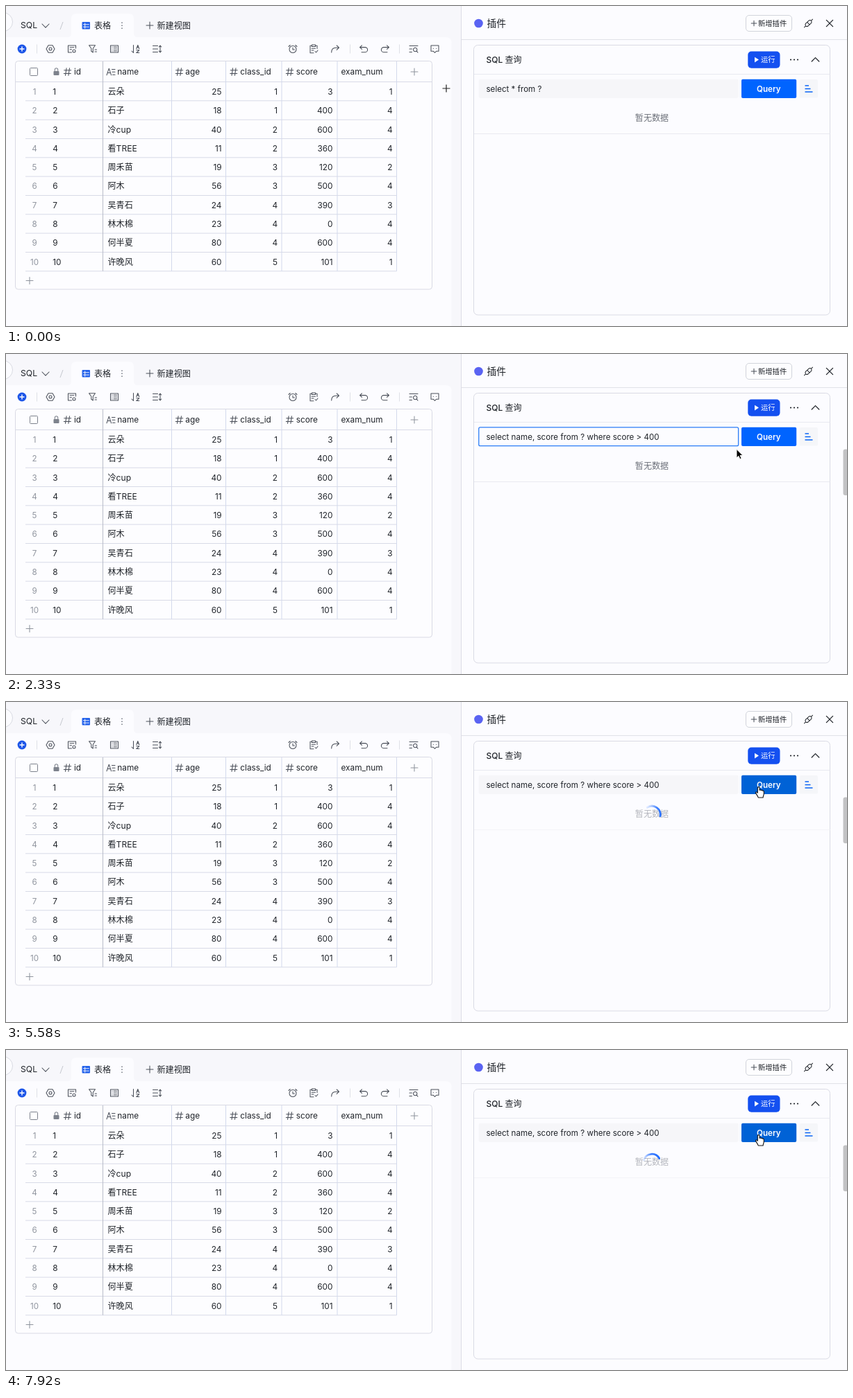
Animation, 1211 px wide and 462 px high, one loop 8000 ms. Source, as an HTML page:

```html
<!DOCTYPE html>
<html lang="zh-CN">
<head>
<meta charset="utf-8">
<title>SQL 查询</title>
<style>
html, body { margin: 0; width: 100%; height: 100%; overflow: hidden; background: #fcfcff; }
svg { display: block; width: 100%; height: 100%; }
text { font-family: Inter, "Noto Sans CJK SC", "Noto Sans CJK", sans-serif; font-size: 11.6px; fill: #1f2329; white-space: pre; }
.cell { font-size: 11.8px; }
.cjk { font-size: 12.1px; }
.small { font-size: 10.3px; }
.icon { fill: none; stroke: #4b505a; stroke-width: 1.05; stroke-linecap: round; stroke-linejoin: round; }
</style>
</head>
<body>
<svg id="stage" viewBox="0 0 1211 462" xmlns="http://www.w3.org/2000/svg">
  <defs>
    <linearGradient id="fade" gradientUnits="userSpaceOnUse" x1="-12" y1="0" x2="11" y2="0">
      <stop offset="0" stop-color="#1f6bff" stop-opacity=".12"/>
      <stop offset=".5" stop-color="#1f6bff" stop-opacity=".85"/>
      <stop offset="1" stop-color="#1f6bff"/>
    </linearGradient>
  </defs>
  <g id="left"></g>
  <g id="right"></g>
  <g id="query">
    <rect id="field" x="680.8" y="105.8" width="373.8" height="26.9" rx="2" stroke-width="1.3"/>
    <rect id="selection" x="691.5" y="107" width="80.5" height="25" fill="#b3d7ff"/>
    <text id="sql" x="691.5" y="123.5"></text>
    <path id="caret" stroke="#111" stroke-width="1"/>
    <rect id="button" x="1059" y="105.7" width="79.2" height="27.2" rx="2"/>
    <text x="1098.3" y="123.5" text-anchor="middle" style="fill:#fff;font-weight:600">Query</text>
    <text id="empty" class="cjk" x="930" y="166.4" text-anchor="middle">暂无数据</text>
    <path id="rule" d="M674 184.5H1186.5"/>
    <path id="spinner" fill="none" stroke="url(#fade)" stroke-width="2.8" stroke-linecap="round"/>
    <rect id="thumb" x="1205.5" y="137.5" width="7" height="66.5" rx="3" fill="#c2c2c4"/>
  </g>
  <g id="cursor">
    <path id="cross" d="M-5.5 0H5.5M0-5.5V5.5" stroke="#222" stroke-width="1.2"/>
    <path id="beam" d="M-3-6.5Q0-6.5 0-5Q0-6.5 3-6.5M0-5V5M-3 6.5Q0 6.5 0 5Q0 6.5 3 6.5M-1.5 1H1.5" fill="none" stroke="#111" stroke-width="1.1"/>
    <path id="arrow" d="M0 0V12.5L2.9 9.8 4.9 14.2 7 13.2 5.1 9H9Z" fill="#000" stroke="#fff" stroke-width=".9"/>
    <path id="hand" d="M-3.2-4.5a1.4 1.4 0 0 1 2.8 0V-1.2c.6-.8 2-.6 2.2.3 .7-.6 2-.3 2.1.6 .8-.4 1.9 0 1.9 1V4c0 2-1 2.5-1.2 5.5H-2.3C-2.6 7.5-5.8 4-6 2.4c-.1-1.2 1.5-1.4 2.8.3Z" fill="#fff" stroke="#111" stroke-width="1.1" stroke-linejoin="round"/>
  </g>
</svg>
<script>
const $ = id => document.getElementById(id);
const set = (id, attrs) => { for (const k in attrs) $(id).setAttribute(k, attrs[k]); };
const show = (id, on) => { $(id).style.display = on ? '' : 'none'; };

const rect = (x, y, w, h, fill, rx = 0, stroke = 'none') =>
  `<rect x="${x}" y="${y}" width="${w}" height="${h}" rx="${rx}" fill="${fill}" stroke="${stroke}"/>`;
const line = (d, color, w = 1) => `<path d="${d}" fill="none" stroke="${color}" stroke-width="${w}"/>`;
const text = (x, y, s, { cls = '', anchor = 'start', style = '' } = {}) =>
  `<text x="${x}" y="${y}" class="${cls}" text-anchor="${anchor}" style="${style}">${s}</text>`;
const icon = (x, y, d, style = '') =>
  `<path class="icon" transform="translate(${x} ${y})" d="${d}" style="${style}"/>`;
const ring = r => `M${-r} 0a${r} ${r} 0 1 0 ${2 * r} 0a${r} ${r} 0 1 0 ${-2 * r} 0`;

const PLUS = 'M-5 0H5M0-5V5';
const HASH = 'M-4.8-2.2H5.2M-5.2 2.4H4.8M-1.4-5.3L-3 5.3M3-5.3L1.4 5.3';
const GRID = '#d8dae7';

const names = ['云朵', '石子', '冷cup', '看TREE', '周禾苗', '阿木', '吴青石', '林木棉', '何半夏', '许晚风'];
const columns = [
  [310.5, [25, 18, 40, 11, 19, 56, 24, 23, 80, 60]],
  [391, [1, 1, 2, 2, 3, 3, 4, 4, 4, 5]],
  [470.5, [3, 400, 600, 360, 120, 500, 390, 0, 600, 101]],
  [556.5, [1, 4, 4, 4, 2, 4, 3, 4, 4, 1]]
];

function tabs() {
  return rect(0, 0, 656, 462, '#f7f7fb') +
    `<path d="M0 45H633Q641.5 45 641.5 53V462H0Z" fill="#fcfcff"/>` +
    `<path d="M88 45Q94 45 94 39V18Q94 11 101 11H177Q184 11 184 18V39Q184 45 190 45Z" fill="#fcfcff"/>` +
    `<circle cx="-4" cy="23" r="13.5" fill="#fcfcff" stroke="#d9dbe2"/>` +
    text(21, 32.4, 'SQL', { style: 'font-size:12.2px' }) +
    icon(57, 28.5, 'M-5-2.5L0 2.7 5-2.5') +
    line('M82 23L78 34', '#c5c8cf') +
    rect(109.5, 23, 11.5, 10.5, '#2563eb', 1) +
    line('M111 26.7H119.8M111 30.2H119.8M113.7 24.5V32.5', '#fcfcff', .9) +
    text(127, 32.5, '表格', { cls: 'cjk' }) +
    [24.2, 28.2, 32.2].map(y => `<circle cx="167" cy="${y}" r=".9" fill="#7d828c"/>`).join('') +
    icon(207, 28, PLUS) + text(217.5, 32.5, '新建视图', { cls: 'cjk' });
}

function toolbar() {
  const lines = [-2.8, 0, 2.8].map(y => `M-3.5 ${y}h.3M-1 ${y}H3.5`).join('');
  return `<circle cx="23" cy="62" r="6.4" fill="#1d56e8"/>` +
    icon(23, 62, 'M-3 0H3M0-3V3', 'stroke:#fff;stroke-width:1.4') +
    line('M44.5 55.5V68.5M495.5 55.5V68.5M566.5 55.5V68.5', '#dfe1e6') +
    icon(64, 62, 'M-3-5.2H3L6 0 3 5.2H-3L-6 0Z' + ring(2)) +
    icon(95, 62, 'M5.5-1V-5H-5.5V5H-.5M-3-2.2H3M-3 .8H-.5M1 3a2 2 0 1 0 4 0a2 2 0 1 0-4 0') +
    icon(125, 62, 'M-5.5-5.2H3.5L.3-.8V5L-2.2 3.2V-.8ZM3 1H5.5M3 4H5.5') +
    icon(156, 62, 'M-5.5-5H5.5V5H-5.5Z' + lines) +
    icon(187, 62, 'M-3.5-5.5V5.5L-6 3M.8 5.5H4.8M.8-.2L2.8-5.5 4.8-.2M1.4-2H4.2M.8 1.8H4.8L.8 5.5') +
    icon(217.5, 62, 'M-6-4.5H1M-6 0H1M-6 4.5H1M4.5-4.5V4.5M2.8-3L4.5-5 6.2-3M2.8 3L4.5 5 6.2 3') +
    icon(413, 62.5, ring(5) + 'M0-2.5V.5H2.5M-6-4L-3.8-6M6-4L3.8-6') +
    icon(443, 62, 'M-2.5-4.7H-5V5.7H0M2.5-4.7H5V-.5M-2.5-6H2.5V-3.5H-2.5ZM-2.8-.8H2.5M-2.8 2H0M2 3.5L3.5 5 6 2') +
    icon(474, 62, 'M2.2-5L5.5-1.8 2.2 1.4M5.5-1.8H1C-3-1.8-5.3 .8-5.3 5') +
    icon(515, 62, 'M-2.5-5.2L-5.5-2.4-2.5 .4M-5.5-2.4H2A3.6 3.6 0 0 1 2 4.8H-3') +
    icon(546, 62, 'M2.5-5.2L5.5-2.4 2.5 .4M5.5-2.4H-2A3.6 3.6 0 0 0-2 4.8H3') +
    icon(587, 62, 'M-6-4.5H6M-6 0H-2.5M-6 4.5H-2.5M-.5 1a2.7 2.7 0 1 0 5.4 0a2.7 2.7 0 1 0-5.4 0M4.2 3.2L6 5.2') +
    icon(617.5, 62, 'M-5.5-5H5.5V3.3H2L0 5.5-2 3.3H-5.5ZM-2.2-.8h.2M2-.8h.2');
}

function table() {
  const step = 27.33, top = 109.5, bottom = top + step * 10;
  let s = rect(13.5, 79.5, 600, 329.5, '#fdfdff', 4, '#d9dae4') +
    line(`M14 ${top}H613`, GRID);
  for (let i = 1; i <= 10; i++) s += line(`M28 ${(top + step * i).toFixed(1)}H562.5`, GRID);
  s += [238.5, 316.5, 397, 477, 562.5].map(x => line(`M${x} 80V${bottom}`, '#d3d9ec')).join('') +
    line(`M139.5 80V${bottom}`, '#b9bcc8');

  s += rect(34.5, 89.5, 11, 11, '#fff', 1, '#7d828c') +
    rect(68.5, 94, 8, 6, '#7d828c', 1) + icon(72.5, 94, 'M-2.2 0V-2a2.2 2.2 0 0 1 4.4 0V0', 'stroke:#7d828c') +
    [88.5, 249.5, 328, 408.5].map(x => icon(x, 95, HASH)).join('') +
    icon(151, 95, 'M-6 4.8L-2.7-4.8 .6 4.8M-4.9 1.5H-.5M1.5-3.5H6M2 .3H6M2.5 4.2H6') +
    icon(588, 95, PLUS, 'stroke:#8f949e') + icon(34, 396.5, PLUS, 'stroke:#8f949e');
  [['id', 98], ['name', 160.3], ['age', 258.3], ['class_id', 337.3], ['score', 417.8], ['exam_num', 482.5]]
    .forEach(([label, x]) => { s += text(x, 99, label, { cls: 'cell' }); });

  names.forEach((name, i) => {
    const y = (127.8 + step * i).toFixed(1);
    s += text(41, y, i + 1, { anchor: 'middle', style: 'fill:#8f949e' }) +
      text(67.3, y, i + 1, { cls: 'cell' }) + text(146.5, y, name, { cls: 'cjk' });
    columns.forEach(([x, values]) => { s += text(x, y, values[i], { cls: 'cell', anchor: 'end' }); });
  });
  return s;
}

function panel() {
  return rect(655.5, 0, 556, 462, '#fcfcff') +
    line('M655.5 0V462', '#dcdde6') + line('M656 48.5H1211', '#e0e1e8') +
    `<circle cx="680.5" cy="25" r="6.3" fill="#5a63f2"/>` +
    text(692.5, 30, '插件', { style: 'font-size:13.8px;font-weight:500' }) +
    rect(1065.5, 13.5, 66, 23, '#fdfdff', 4.5, '#d2d4db') +
    icon(1077, 25, 'M-3.8 0H3.8M0-3.8V3.8') + text(1083, 28.8, '新增插件', { cls: 'small' }) +
    icon(1155.5, 25, 'M-1.8-1.6L.6-4Q2.4-5.2 4-3.8Q5.2-2 4-.4L1.6 2ZM4.2-4L6-5.8M1.8 1.6L-.6 4Q-2.4 5.2-4 3.8Q-5.2 2-4 .4L-1.6-2M-4.2 4L-6 5.8', 'stroke:#1f2329') +
    icon(1186, 25, 'M-4.6-4.6L4.6 4.6M4.6-4.6L-4.6 4.6', 'stroke:#1f2329;stroke-width:1.3') +
    rect(673.5, 56.5, 513, 389.5, '#fcfcff', 6, '#dadbe4') + line('M674 98.5H1186.5', '#e8e9f0') +
    text(691.5, 81.8, 'SQL 查询', { style: 'font-size:12px;font-weight:500' }) +
    `<rect id="run" x="1068.3" y="65.5" width="46.2" height="24.2" rx="5"/>` +
    `<path d="M1078 73.8L1084 77.6 1078 81.4Z" fill="#fff"/>` +
    text(1087, 81.3, '运行', { cls: 'small', style: 'fill:#fff' }) +
    [1130, 1135, 1140].map(x => `<circle cx="${x}" cy="77.5" r="1.1" fill="#1f2329"/>`).join('') +
    icon(1165.5, 77.3, 'M-5.3 2.7L0-2.7 5.3 2.7', 'stroke:#1f2329;stroke-width:1.2') +
    rect(1142.5, 106, 26.5, 26.5, '#f5f6f9', 2) +
    line('M1150.5 115H1156M1150.5 119.5H1158.5M1150.5 124H1161.5', '#0a64f5', 1.6);
}

// Pointer stops: [step, shape, x, y]
const stops = [
  [0, 'cross', 634, 119], [7, 'arrow', 662, 118], [8, 'beam', 764, 118], [9, 'beam', 802, 118],
  [26, 'beam', 918, 124], [27, 'arrow', 1010, 142], [28, 'arrow', 1052, 137.5], [29, 'arrow', 1073, 134],
  [30, 'hand', 1083, 129], [31, 'hand', 1085.5, 128.5]
];
const STEP = 1000 / 12, LOOP = 8000;

function mix(a, b, k) {
  return `rgb(${a.map((v, i) => Math.round(v + (b[i] - v) * Math.min(1, Math.max(0, k))))})`;
}

function draw(time) {
  const n = Math.floor((time + 5) / STEP);
  const focused = n >= 11 && n < 36, loading = n >= 39, pasted = n >= 22;

  const lit = n < 12 ? (n - 2) / 3 : 0;
  set('run', { fill: mix([20, 80, 240], [44, 104, 252], lit) });
  const fieldFill = n < 8 || n >= 36 ? '#f6f6f9' : n < 11 ? '#eeeff2' : n === 11 ? '#dedfe3' : '#fcfcff';
  set('field', { fill: fieldFill, stroke: focused ? '#2a7cf6' : 'none' });
  show('selection', n >= 16 && n < 22);
  $('sql').textContent = pasted ? 'select name, score from ? where score > 400' : 'select * from ?';
  show('caret', (n >= 11 && n < 16) || (n >= 22 && n < 26));
  set('caret', { d: `M${pasted ? 941 : 772} 112.5V126` });
  set('button', { fill: mix([0, 100, 255], [0, 98, 214], (n - 29) / 3) });
  $('empty').style.fill = loading ? '#b4b6bd' : '#6c7079';
  set('rule', { stroke: loading ? '#f4f4f8' : '#e9eaf0' });
  show('thumb', n >= 8);

  show('spinner', loading);
  if (loading) {
    const since = (n - 39) * STEP;
    const angle = 79 + since * 360 / 600 - 25 * Math.max(0, 1 - since / 250);
    set('spinner', { transform: `translate(930 162.5) rotate(${angle % 360})` });
  }

  const [, shape, x, y] = stops.filter(s => s[0] <= n).pop();
  ['cross', 'beam', 'arrow', 'hand'].forEach(id => show(id, id === shape));
  set('cursor', { transform: `translate(${x} ${y})` });
}

function arc(from, to, r) {
  const at = deg => {
    const a = deg * Math.PI / 180;
    return `${(r * Math.sin(a)).toFixed(2)} ${(-r * Math.cos(a)).toFixed(2)}`;
  };
  return `M${at(from)}A${r} ${r} 0 0 1 ${at(to)}`;
}

$('left').innerHTML = tabs() + toolbar() + table();
$('right').innerHTML = panel();
set('spinner', { d: arc(-72, 62, 12.3) });

function tick() {
  draw(performance.now() % LOOP);
  requestAnimationFrame(tick);
}
tick();
</script>
</body>
</html>
```
